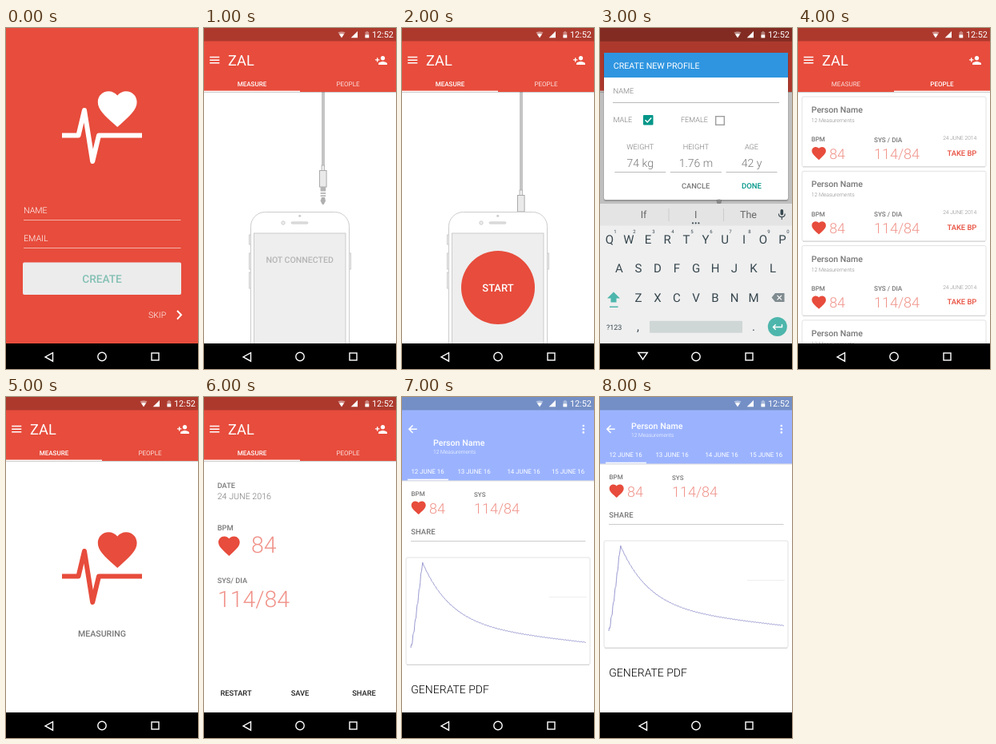
Recreate the animation shown at these times as an HTML page. Size 240 by 427 pixels, loop 9 s.

```html
<!DOCTYPE html>
<html>
<head>
<meta charset="utf-8">
<style>
html, body { margin: 0; height: 100%; overflow: hidden; background: #fff; }
svg { display: block; width: 100vw; height: 100vh; font-family: Roboto, sans-serif; text-rendering: geometricPrecision; }
</style>
</head>
<body>
<svg id="stage" viewBox="0 0 240 427"></svg>
<script>
const RED = '#e74c3c', PINK = '#f0938a', TEAL = '#009688', GRAY = '#777', INK = '#37474f';

const text = (x, y, size, str, fill = '#fff', weight = 400, anchor = 'start') =>
  `<text x="${x}" y="${y}" font-size="${size}" fill="${fill}" font-weight="${weight}" text-anchor="${anchor}">${str}</text>`;
const mid = (x, y, size, str, fill, weight) => text(x, y, size, str, fill, weight, 'middle');
const rect = (x, y, w, h, fill, more = '') =>
  `<rect x="${x}" y="${y}" width="${w}" height="${h}" fill="${fill}" ${more}/>`;
const line = (d, stroke = '#fff', width = 1, more = '') =>
  `<path d="${d}" fill="none" stroke="${stroke}" stroke-width="${width}" ${more}/>`;
const fill = (d, color = '#fff') => `<path d="${d}" fill="${color}"/>`;
const dot = (x, y, r, color = '#fff', more = '') => `<circle cx="${x}" cy="${y}" r="${r}" fill="${color}" ${more}/>`;
const move = (x, y, body, scale = 1) => `<g transform="translate(${x} ${y}) scale(${scale})">${body}</g>`;

const heart = (x, y, w, color = RED) => {
  const s = w / 20;
  return move(x - 2 * s, y - 3 * s, fill('M12 21.35l-1.45-1.32C5.4 15.36 2 12.28 2 8.5 2 5.42 4.42 3 7.5 3c1.74 0 3.41.81 4.5 2.09C13.09 3.81 14.76 3 16.5 3 19.58 3 22 5.42 22 8.5c0 3.78-3.4 6.86-8.55 11.54L12 21.35z', color), s);
};
const pulse = (color) =>
  line('M70 134.5H90.5L98 103L108.2 167L116 134.5H170', color, 6, 'stroke-linejoin="round"') +
  heart(114.8, 79.3, 48.8, color);

const nav = (keyboard) => rect(0, 395, 240, 32, '#000') +
  line(keyboard ? 'M47.7 406.5H59.3L53.5 415Z' : 'M58.5 406.6V417.2L49 411.9Z', '#fff', 1.4) +
  dot(120, 411.5, 5.2, 'none', 'stroke="#fff" stroke-width="1.4"') +
  rect(182, 407, 9, 9, 'none', 'stroke="#fff" stroke-width="1.4"');

const status = (color) => rect(0, 0, 240, 16.5, color) +
  fill('M167.5 5.5Q172 3.5 176.5 5.5L172 12.3Z', '#ffffff70') + fill('M169 7.8Q172 6.6 175 7.8L172 12.3Z') +
  fill('M192 4V12.3H183.7Z') +
  fill('M201.5 5H202.8V4H204.8V5H206.2V12.3H201.5Z', '#ffffff60') + rect(201.5, 8.5, 4.7, 3.8, '#fff') +
  text(237, 12, 10.9, '12:52', '#fff', 400, 'end');

const appBar = (tab) => rect(0, 16, 240, 64, RED) + status('#ad392d') +
  line('M7.2 36.5H19.3M7.2 40.2H19.3M7.2 43.8H19.3', '#fff', 1.5) + text(30, 47, 18.2, 'ZAL') +
  move(213.3, 32.4, fill('M15 12c2.21 0 4-1.79 4-4s-1.79-4-4-4-4 1.79-4 4 1.79 4 4 4zm-9-2V7H4v3H1v2h3v3h2v-3h3v-2H6zm9 4c-2.67 0-8 1.34-8 4v2h16v-2c0-2.66-5.33-4-8-4z'), .68) +
  ['MEASURE', 'PEOPLE'].map((s, i) =>
    mid(60 + 120 * i, 72.7, 8.05, s, i == tab ? '#fff' : '#ffffffd0', i == tab ? 500 : 400)).join('') +
  rect(120 * tab, 78.6, 120, 1.6, '#fff') + rect(0, 80, 240, 1, '#0003');

const splash = () => rect(0, 0, 240, 395, RED) + pulse('#fff') +
  ['NAME', 'EMAIL'].map((s, i) =>
    text(22, 232 + 34.5 * i, 10.7, s, '#fff', 300) + line(`M22 ${240.5 + 35 * i}H218.5`, '#ffffff90')).join('') +
  rect(21, 293.5, 198, 40.5, '#ececec', 'rx="2"') + mid(120, 319, 13.7, 'CREATE', '#84c0b4', 500) +
  text(178, 363, 10.5, 'SKIP', '#fff', 300) + line('M214 354L219 359.3L214 364.6', '#fff', 2) + nav();

const plug = () => rect(147, -60, 4, 232, '#c4c4c4') +
  rect(147, 172, 3.6, 6.5, '#eee', 'stroke="#aaa" stroke-width=".8"') +
  rect(144.5, 178.5, 8.6, 20.5, '#eaeaea', 'stroke="#aaa"') +
  rect(145.6, 199, 6.6, 5.5, '#b5b5b5') + rect(145.6, 206, 6.6, 1.8, '#b5b5b5') +
  rect(145.6, 209.3, 6.6, 1.8, '#b5b5b5') +
  fill('M147 212H151L152 216.5L150 220.5Q148.9 221.8 147.6 220.5L145.6 216.5Z', '#b0b0b0');

const phone = () => {
  const edge = 'stroke="#ccc"';
  return [[56.5, 259, 12], [56.5, 282, 20], [56.5, 306, 20], [181, 282, 20]]
    .map(([x, y, h]) => rect(x, y, 2.5, h, '#eee', edge)).join('') +
    rect(58.5, 230.5, 123, 250, '#fff', edge + ' rx="18"') + rect(62.5, 257, 114.5, 150, '#eee', edge) +
    dot(99, 244, 2.2, '#eee', edge) + dot(119.7, 235.3, 1.5, '#ccc') +
    rect(109, 242.8, 21, 2.4, '#ddd', edge + ' stroke-width=".7" rx="1.2"');
};

const measure = (plugged) => move(0, plugged ? 31 : 0, plug()) + phone() +
  (plugged
    ? dot(120, 325, 46, RED) + mid(120, 329.5, 13, 'START', '#fff', 500)
    : mid(119.7, 294, 10.6, 'NOT CONNECTED', '#b5b5b5', 500)) +
  appBar(0) + nav();

const keyRow = (keys, x, y) => [...keys].map((k, i) => mid(x + 24 * i, y, 15, k, INK)).join('');
const keyboard = () => rect(0, 220, 240, 175, '#efefef') + rect(0, 220, 240, 27.5, '#e4e4e4') +
  line('M86 226V242M154.5 226V242', '#ccc') +
  mid(54.5, 238, 12.5, 'If', '#666') + mid(119.7, 238, 12.5, 'I', '#666') + mid(185.5, 238, 12.5, 'The', '#666') +
  [116, 119.7, 123.4].map(x => dot(x, 244.3, 1.1, INK)).join('') +
  rect(225.5, 227, 3.6, 7.5, INK, 'rx="1.8"') + line('M223.4 232.5C223.4 238 231.2 238 231.2 232.5M227.3 236.5V240', INK, 1.1) +
  keyRow('QWERTYUIOP', 12, 269.7) + keyRow('ASDFGHJKL', 24, 306) + keyRow('ZXCVBNM', 48, 343) +
  [...'1234567890'].map((k, i) => mid(19 + 24 * i, 256.7, 6, k, INK)).join('') +
  fill('M17 330.5L25 338.5H20.5V343.5H13.5V338.5H9Z', '#4db6ac') + rect(12, 348.5, 10.5, 1.5, '#4db6ac') +
  fill('M214.5 337.5L219 332H230.5V343H219Z', '#808b90') + line('M221.5 334.8L227 340.3M227 334.8L221.5 340.3', '#fff', 1.2) +
  text(8, 377.5, 9, '?123', INK) + mid(47.5, 379, 15, ',', INK) + mid(192, 379, 15, '.', INK) +
  rect(62, 366.7, 116, 15, '#cfd6d6', 'rx="1"') + dot(221.8, 374, 12, '#4db6ac') +
  line('M227.5 371V374.5H216.5M219.7 371.3L216.5 374.5L219.7 377.7', '#fff', 1.4);

const dialog = () => measure(false) + rect(0, 16, 240, 379, '#000', 'opacity=".25"') +
  status('#822b22') +
  rect(4.5, 31, 231, 186, '#0003', 'rx="3"') + rect(5, 31, 230, 184, '#fff', 'rx="2"') +
  rect(5, 31, 230, 31, '#2f95e0') + text(16.8, 51, 10.65, 'CREATE NEW PROFILE') +
  dot(148.8, 217.5, 3, '#888') +
  text(16.5, 82, 9.3, 'NAME', GRAY, 300) + line('M16 93.5H224', '#bbb') +
  text(16.5, 118, 9.2, 'MALE', GRAY, 300) + text(101, 118, 9.1, 'FEMALE', GRAY, 300) +
  rect(54, 109, 12.5, 12.5, TEAL, 'rx="1"') + line('M56.5 115.2L59.2 118L64.2 112.5', '#fff', 1.5) +
  rect(144.7, 110.7, 10.6, 10.6, '#fff', 'stroke="#999" stroke-width="1.3"') +
  [['WEIGHT', '74 kg'], ['HEIGHT', '1.76 m'], ['AGE', '42 y']].map(([label, value], i) => {
    const x = 50.3 + 69.6 * i;
    return mid(x, 151.5, 9.2, label, GRAY, 300) + mid(x, 173.5, 14, value, GRAY, 300) +
      line(`M${x - 32} 180.5H${x + 32}`, '#bbb');
  }).join('') +
  mid(119.6, 201, 9.3, 'CANCLE', GRAY, 500) + mid(189.5, 201, 9.5, 'DONE', TEAL, 500) +
  keyboard() + nav(true);

const person = () => rect(5, 86, 230, 87.5, '#fff', 'rx="2" stroke="#e2e2e2"') + line('M6 174H234', '#d5d5d5') +
  text(16.7, 106, 10.6, 'Person Name', GRAY, 500) + text(16.7, 118, 6.8, '12 Measurements', '#888', 300) +
  text(16.7, 142.3, 8, 'BPM', GRAY, 500) + text(95, 142.5, 8.2, 'SYS / DIA', GRAY, 500) +
  text(223.3, 140, 6.7, '24 JUNE 2014', '#888', 300, 'end') +
  heart(17.3, 149, 17.6) + text(39.2, 163.7, 17.8, '84', PINK, 300) + text(95, 163.7, 18, '114/84', PINK, 300) +
  text(223.3, 159.5, 9.35, 'TAKE BP', RED, 500, 'end');
const people = () => [0, 1, 2, 3].map(i => move(0, 93.3 * i, person())).join('') + appBar(1) + nav();

const measuring = () => move(0, 90, pulse(RED)) + mid(120, 300, 10.6, 'MEASURING', GRAY, 500) + appBar(0) + nav();

const result = () => appBar(0) +
  text(16.7, 113.5, 9.2, 'DATE', GRAY, 500) + text(16.7, 128, 10.7, '24 JUNE 2016', GRAY, 300) +
  text(16.7, 167, 9.3, 'BPM', GRAY, 500) + heart(18, 174.5, 26.7) + text(59, 195, 28.5, '84', PINK, 300) +
  text(16.7, 233, 9.2, 'SYS/ DIA', GRAY, 500) + text(17, 263, 28.4, '114/84', PINK, 300) +
  ['RESTART', 'SAVE', 'SHARE'].map((s, i) => mid(40 + 80 * i, 374, 9.3, s, '#222', 500)).join('') + nav();

// Steep ragged rise, then exponential decay
const curve = () => {
  let d = 'M11 293';
  for (let x = 11.5; x <= 230; x += .75) {
    const t = x - 25.5;
    const y = t < 0
      ? 294 - 108 * ((x - 11) / 14.5) ** 1.2 + 3 * Math.sin(x * 2.6)
      : 186 + 79 * (1 - Math.exp(-t / 36)) + .105 * t + .4 * Math.sin(x * 1.9);
    d += `L${x} ${y.toFixed(1)}`;
  }
  return line(d, '#9a9ad2', 1);
};
const history = (drop) => rect(0, 16, 240, 67.5 + drop, '#9bb3ff') + status('#748fc6') +
  line('M18.7 40.2H9M13.5 35.5L8.8 40.2L13.5 44.9', '#fff', 1.5) +
  [36, 40.2, 44.4].map(y => dot(226.8, y, 1.3)).join('') +
  move(0, drop,
    text(39, 40, 10.6, 'Person Name', '#fff', 500) + text(39, 50, 6.7, '12 Measurements', '#fff', 300) +
    [32, 90, 152, 207.5].map((x, i) => mid(x, 75, 7.9, 12 + i + ' JUNE 16')).join('') +
    rect(7, 81.7, 51, 1.8, '#fff') + rect(0, 83.5, 240, 1, '#0002') +
    text(11.5, 103.3, 8, 'BPM', GRAY, 500) + text(90, 103.5, 8, 'SYS', GRAY, 500) +
    heart(11.7, 109.6, 18) + text(34, 124.7, 18, '84', PINK, 300) + text(90, 124.7, 18, '114/84', PINK, 300) +
    text(11.3, 150.5, 9.5, 'SHARE', GRAY, 500) + line('M11 159.5H229.5', '#ccc') +
    rect(5, 180, 230, 134, '#fff', 'rx="2" stroke="#e2e2e2"') + line('M6 314.5H234', '#d5d5d5') +
    line('M184 229.5H231', '#eee') + curve() + text(11.3, 350, 14, 'GENERATE PDF', '#000', 300)) + nav();

const scenes = [splash(), measure(false), measure(true), dialog(), people(), measuring(), result(), history(21), history(0)];
const stage = document.getElementById('stage');
const start = performance.now();
let shown = -1;
function tick() {
  const i = Math.floor((performance.now() - start) / 1000) % scenes.length;
  if (i != shown) stage.innerHTML = scenes[shown = i];
  requestAnimationFrame(tick);
}
tick();
</script>
</body>
</html>
```
